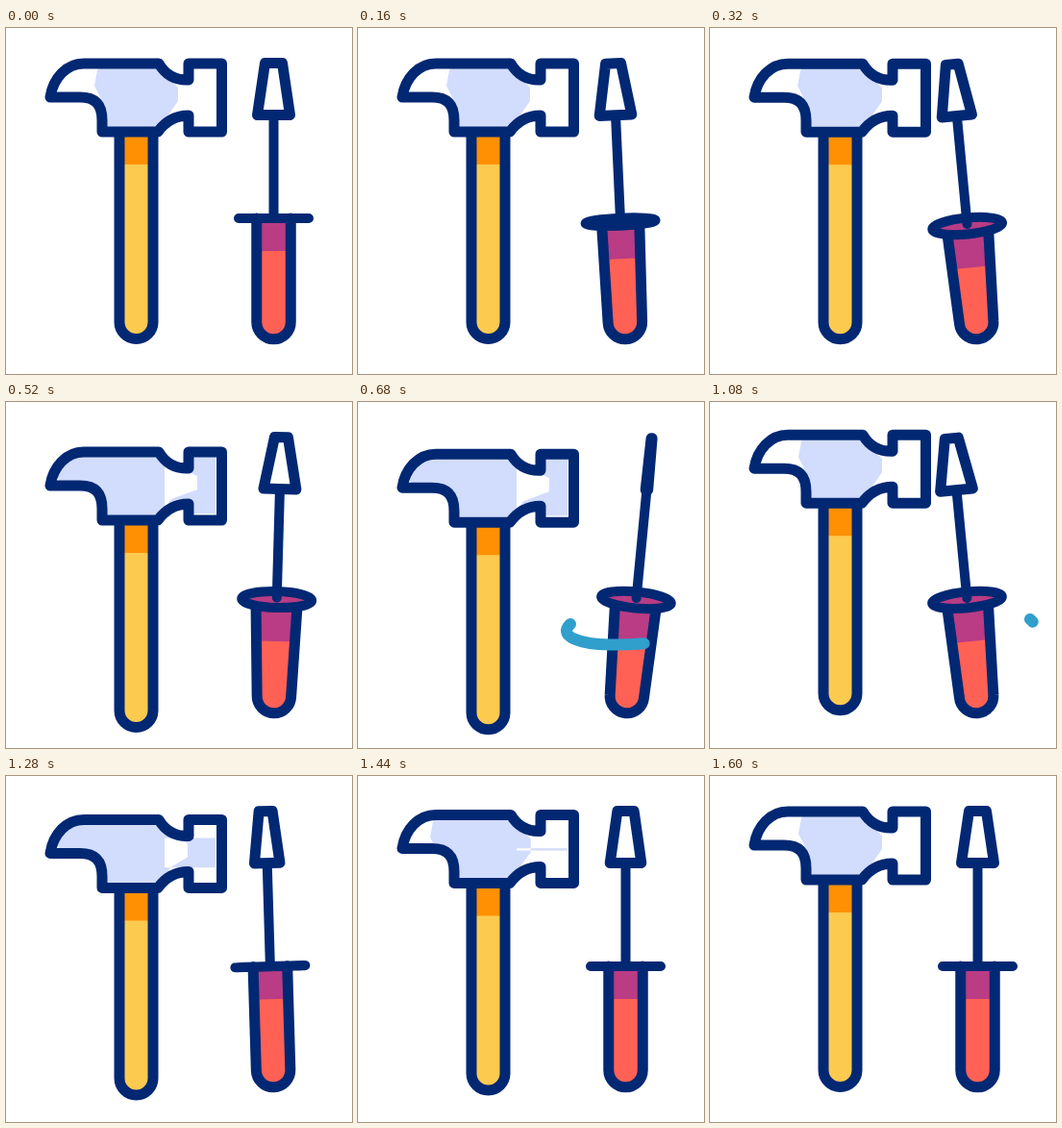
An HTML page for the animation above (2080 ms loop, 360x360 px).

```html
<!DOCTYPE html>
<html lang="en">
<head>
<meta charset="utf-8">
<title>Hammer and screwdriver</title>
<style>
html, body { margin: 0; height: 100%; overflow: hidden; background: #fff; }
svg { display: block; width: 100vw; height: 100vh; }
.ink { stroke: #022873; stroke-width: 11; stroke-linecap: round; stroke-linejoin: round; }
.thin { stroke-width: 10; }
</style>
</head>
<body>
<svg viewBox="0 0 360 360" fill="none">
  <defs>
    <path id="headShape" d="M46 72C49 52 63 37 81 37H159C166 49 177 54.5 190 54V37H224.500V108H190V91C176 91 166 97 158 108H100V96C100 80 93 72 77 72Z"/>
    <clipPath id="headClip"><use href="#headShape"/></clipPath>
  </defs>
  <g id="hammer">
    <path d="M118 108V306A17.500 17.500 0 0 0 153 306V108Z" fill="#fdca50"/>
    <path d="M118 108H153V142H118Z" fill="#ff9004"/>
    <path class="ink" d="M118 108V306A17.500 17.500 0 0 0 153 306V108"/>
    <use href="#headShape" fill="#fff"/>
    <path id="shade" clip-path="url(#headClip)" fill="#d2dcfc"/>
    <use href="#headShape" class="ink"/>
  </g>
  <g id="driver">
    <path id="grip" fill="#ff6155"/>
    <path id="band" fill="#b93c84"/>
    <path id="gripLine" class="ink"/>
    <path id="collar" class="ink thin" fill="#b93c84"/>
    <path id="shaft" class="ink thin"/>
    <path id="blade" class="ink" fill="#fff"/>
  </g>
  <path id="swoosh" pathLength="1" stroke="#309fcc" stroke-width="12" stroke-linecap="round"
    d="M221 231C207 244 232 252 262 252.500C300 253 358 248 333 226"/>
</svg>
<script>
const LOOP = 2080, STEP = 40, AXIS = 278.5;
const $ = id => document.getElementById(id);
const draw = (id, d) => $(id).setAttribute('d', d);
const clamp = x => Math.min(1, Math.max(0, x));
const progress = (t, from, to) => clamp((t - from) / (to - from));
const ease = u => (1 - Math.cos(Math.PI * u)) / 2;
const ramp = (t, from, to) => ease(progress(t, from, to));

// Eased moves between turning points, each given as [time, value]
const swing = (t, [first, ...rest]) => rest.reduce(
  ([time, value, from], [nextTime, next]) =>
    [nextTime, value + (next - from) * ramp(t, time, nextTime), next],
  [first[0], first[1], first[1]])[1];

function drawHammer(t) {
  const lift = swing(t, [[300, 0], [630, 20], [915, -18], [1220, 9], [1600, 0]]);
  $('hammer').setAttribute('transform', `translate(0 ${lift})`);
  // The shading spreads towards the claw on the way down, and into the poll at both ends
  const left = 92 - 40 * clamp(lift / 8);
  const spread = clamp((Math.abs(lift) - 3) / 11), right = 179 + 20 * spread;
  draw('shade', `M${left + 3} 44L${left} 60L${left + 8} 76L${left + 12} 110H155L172 86L${right} 76V62L162 45L155 36H${left + 8}Z`
    + `M165 ${73 - 34 * spread}H218V${73 + 28 * spread}H165Z`);
}

function drawDriver(t) {
  const open = ramp(t, 0, 330) - ramp(t, 1060, 1300);
  const lean = ramp(t, 0, 330) - ramp(t, 1080, 1400);
  const tilt = -5.5 * lean * Math.cos(2 * Math.PI * progress(t, 300, 1040));
  const spin = swing(t, [[0, 0], [390, -25], [1240, 400], [1600, 360]]);
  const turn = Math.abs(Math.cos(spin * Math.PI / 180));

  const y = 198 + 7.5 * open, half = 17.75 + 4 * open, split = 232 + 17 * open;
  const top = (9 - 2 * open) * turn, base = 17 * turn;
  const grip = `M${AXIS - half} ${y}L260.75 306A17.75 17.75 0 0 0 296.25 306L${AXIS + half} ${y}`;
  const arc = `A36.5 ${8.5 * open} 0 0 1 `;

  $('driver').setAttribute('transform', `rotate(${tilt} ${AXIS} 320)`);
  draw('grip', grip);
  draw('gripLine', grip);
  draw('band', `M${AXIS - half} ${y}H${AXIS + half}L${AXIS + 18} ${split}H${AXIS - 18}Z`);
  draw('collar', `M${AXIS - 36.5} ${y}${arc}${AXIS + 36.5} ${y}${arc}${AXIS - 36.5} ${y}Z`);
  draw('shaft', `M${AXIS} 92V${y - 2}`);
  draw('blade', `M${AXIS - top} 36.5H${AXIS + top}L${AXIS + base} 90.5H${AXIS - base}Z`);
}

function drawSwoosh(t) {
  const head = progress(t, 560, 755), tail = progress(t, 680, 1090);
  const swoosh = $('swoosh');
  swoosh.style.display = head > 0 && tail < 1 ? '' : 'none';
  swoosh.setAttribute('stroke-dasharray', `${head - tail} 3`);
  swoosh.setAttribute('stroke-dashoffset', -tail);
}

function frame() {
  const t = Math.floor(performance.now() % LOOP / STEP) * STEP;
  drawHammer(t);
  drawDriver(t);
  drawSwoosh(t);
  requestAnimationFrame(frame);
}
frame();
</script>
</body>
</html>
```
